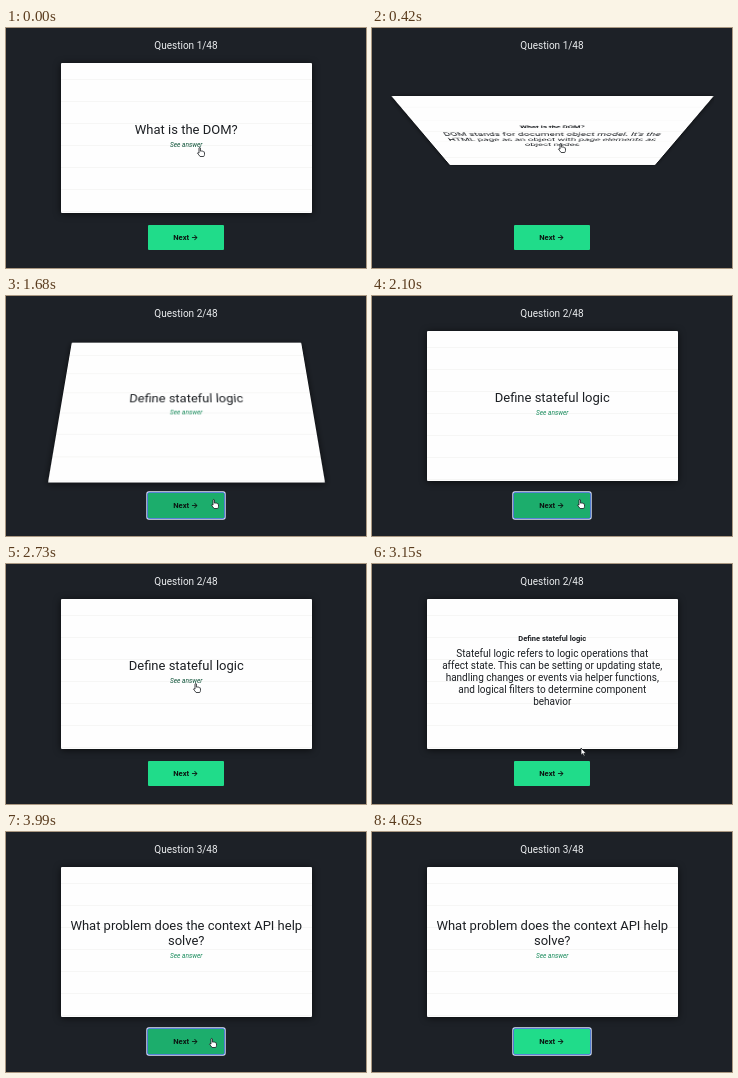
These frames come from a looping animation (360 by 240 pixels, 4830 ms). An HTML page:

```html
<!DOCTYPE html>
<html lang="en">
<head>
<meta charset="utf-8">
<title>Flash cards</title>
<style>
  html, body { margin: 0; width: 100%; height: 100%; overflow: hidden; background: #1d2127; }
  body { position: relative; font-family: Roboto, Inter, sans-serif; color: #1c1f23; text-align: center; }
  #counter {
    position: absolute; left: 0; top: 10px; width: 360px;
    font-size: 10px; line-height: 16px; color: #eceef0;
  }
  #desk {
    position: absolute; left: 18px; top: 0; width: 324px; height: 240px;
    overflow: hidden; perspective: 304px; perspective-origin: 162.25px 110px;
  }
  #card {
    position: absolute; left: 37px; top: 35px; width: 250.5px; height: 150px;
    transform-style: preserve-3d;
  }
  .face {
    position: absolute; inset: 0; display: flex; flex-direction: column; justify-content: center;
    border-radius: 1px; backface-visibility: hidden; white-space: pre-line;
    background: repeating-linear-gradient(#fefefe 0 16px, #f6f6f5 16px 17px, #fefefe 17px 22px);
    box-shadow: 0 1px 7px rgba(0, 0, 0, .65);
  }
  .back { transform: rotateX(180deg); }
  #question { font-size: 13px; line-height: 15.2px; }
  #link { font-size: 6.5px; line-height: 17.5px; font-style: italic; color: #168a5a; }
  #link.hover { color: #0b5136; }
  #heading { font-size: 7.5px; line-height: 13px; font-weight: 700; }
  #answer { font-size: 10px; line-height: 12.1px; margin: 3px 0 7.5px; }
  #next {
    position: absolute; left: 142px; top: 197px; width: 75.5px; height: 25px;
    border-radius: 1px; background: #20dc8a; color: #0c1713;
    font-size: 7.6px; line-height: 25px; font-weight: 700;
  }
  #next.hover { background: #1cad6c; }
  #next.focus { box-shadow: 0 0 0 .8px #2f62cb, 0 0 0 1.7px #dfe9fb; }
  #pointer { position: absolute; left: 0; top: 0; width: 10px; height: 12px; overflow: visible; }
  #pointer path { fill: #fff; stroke: #15181c; stroke-width: .8; stroke-linejoin: round; }
</style>
</head>
<body>
<div id="counter"></div>
<div id="desk">
  <div id="card">
    <div class="face"><div id="question"></div><div id="link">See answer</div></div>
    <div class="face back"><div id="heading"></div><div id="answer"></div></div>
  </div>
</div>
<div id="next">Next →</div>
<svg id="pointer" viewBox="0 0 10 12"><path id="shape"/></svg>
<script>
const LOOP = 4830, STEP = 210;

const cards = [
  { question: "What is the DOM?",
    answer: "DOM stands for document object model. It's the\nHTML page as an object with page elements as\nobject nodes" },
  { question: "Define stateful logic",
    answer: "Stateful logic refers to logic operations that\naffect state. This can be setting or updating state,\nhandling changes or events via helper functions,\nand logical filters to determine component\nbehavior" },
  { question: "What problem does the context API help\nsolve?", answer: "" }
];

const shapes = {
  hand: "M2 .9Q2.8 0 3.4.9V4.1Q4.3 3.5 4.9 4.3Q5.8 3.8 6.3 4.7Q7.4 4.4 7.5 5.5V7.4Q7.4 8.7 6.7 9.5H3.1Q1.8 7.8.5 6.3Q.5 5.2 2 6.1Z",
  arrow: "M0 0V7.2L1.7 5.7L2.8 8.2L4 7.7L2.9 5.3H5.1Z"
};

// Each cue changes only the listed properties; the rest carries over.
const cues = [
  [0, { card: 0, angle: 0, over: "link", focus: false, shape: "hand", at: [191, 119] }],
  [210, { at: [186, 115] }],
  [420, { angle: 115.9 }],
  [630, { angle: 180, over: "", shape: "arrow", at: [196, 150] }],
  [840, { over: "next", shape: "hand", at: [205, 203] }],
  [1470, { focus: true }],
  [1680, { card: 1, angle: 22.4 }],
  [1890, { angle: 0 }],
  [2310, { over: "", shape: "arrow", at: [200, 170] }],
  [2520, { over: "link", shape: "hand", at: [187, 119] }],
  [2730, { focus: false }],
  [2940, { angle: 157.6, over: "" }],
  [3150, { angle: 180, shape: "arrow", at: [209, 184] }],
  [3360, { over: "next", shape: "hand", at: [203, 206] }],
  [3570, { focus: true }],
  [3780, { card: 2, angle: 82.6 }],
  [3990, { angle: 0 }],
  [4410, { over: "", shape: "arrow", at: [200, 227] }],
  [4620, { at: null }]
];

const el = id => document.getElementById(id);
let shown = -1;

function draw(time) {
  const state = Object.assign({}, ...cues.filter(([start]) => start <= time).map(([, change]) => change));
  const { question, answer } = cards[state.card];
  el("counter").textContent = `Question ${state.card + 1}/48`;
  el("question").textContent = question;
  el("heading").textContent = question;
  el("answer").textContent = answer;
  el("card").style.transform = `rotateX(${state.angle}deg)`;
  el("link").classList.toggle("hover", state.over === "link");
  el("next").classList.toggle("hover", state.over === "next");
  el("next").classList.toggle("focus", state.focus);
  el("pointer").style.display = state.at ? "" : "none";
  if (state.at) {
    el("pointer").style.transform = `translate(${state.at[0]}px, ${state.at[1]}px)`;
    el("shape").setAttribute("d", shapes[state.shape]);
  }
}

function tick() {
  const time = Math.floor(performance.now() % LOOP / STEP) * STEP;
  if (time !== shown) draw(shown = time);
  requestAnimationFrame(tick);
}
tick();
</script>
</body>
</html>
```
